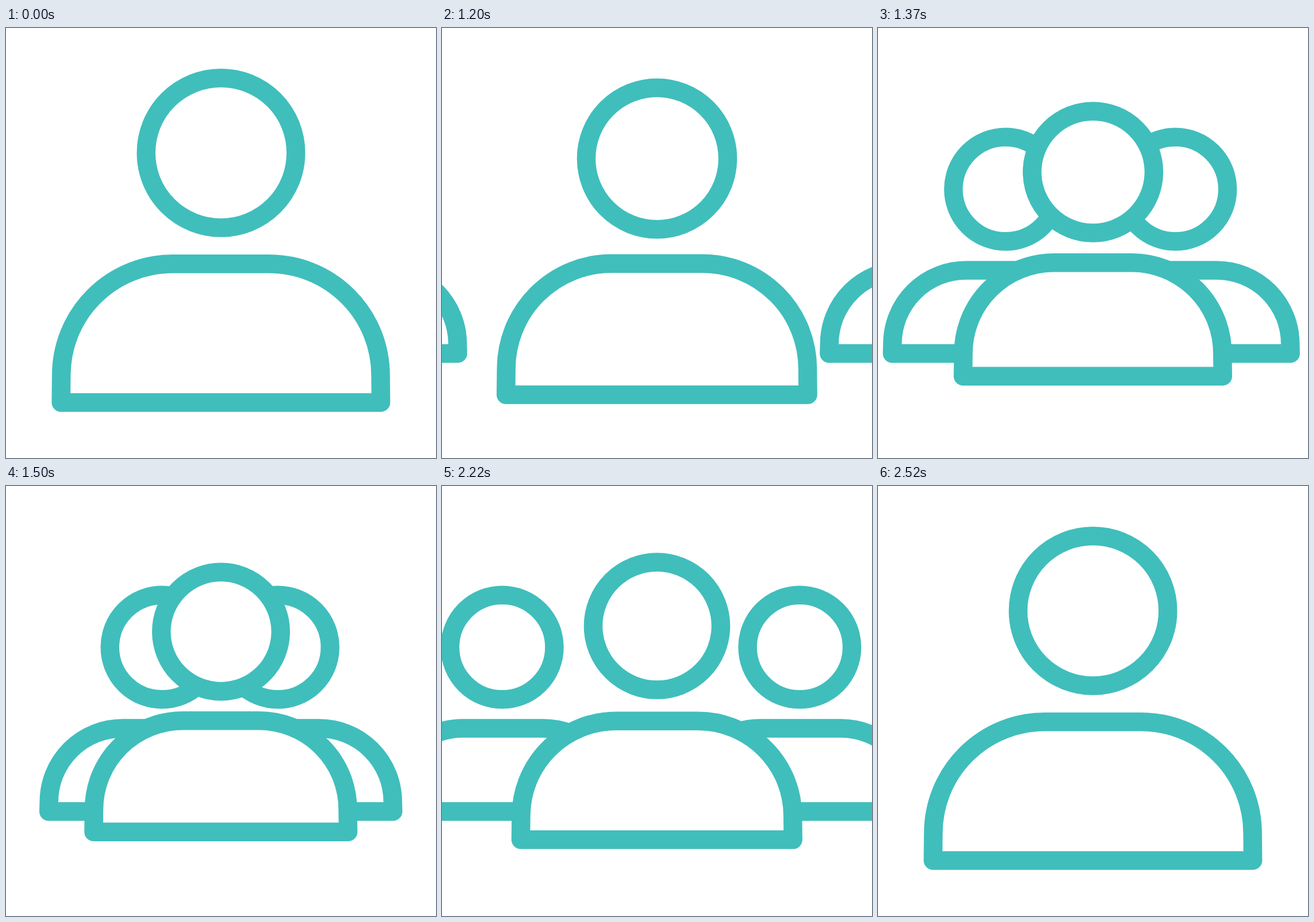
Write an HTML page that moves like this. It is 748 by 748 pixels and loops after 2550 ms.

```html
<!DOCTYPE html>
<html lang="en">
<head>
<meta charset="utf-8">
<title>One to many</title>
<style>
  html, body { margin: 0; width: 100%; height: 100%; overflow: hidden; background: #fff; }
  svg { display: block; width: 100%; height: 100%; }
  circle, path { fill: #fff; stroke: #40bebc; stroke-width: 32.5; stroke-linejoin: round; }
</style>
</head>
<body>
<svg viewBox="0 0 748 748">
  <g id="left"><path/><circle/></g>
  <g id="right"><path/><circle/></g>
  <g id="lead"><path/><circle/></g>
</svg>
<script>
const LOOP = 2550, TICK = 25, STEPS = 20;
const GATHER = 40, SPREAD = 81; // ticks at which each move begins

// Each figure: head centre and radius, body centre, half width, top, bottom, shoulder radius
const single = { hx: 374, hy: 217.2, hr: 130.3, x: 373.9, w: 277.7, top: 410.2, bottom: 651.5, r: 194 };
const grouped = { hx: 374, hy: 253.5, hr: 103.75, x: 373.8, w: 220.8, top: 408.2, bottom: 601.7, r: 154.5 };
const side = { hx: -1.5, hy: 280.5, hr: 90.75, x: 0, w: 198.3, top: 421.5, bottom: 566.2, r: 128 };

const mix = (a, b, p) => a + (b - a) * p;

// cubic-bezier(.6, 0, .4, 1)
function ease(t) {
  let lo = 0, hi = 1;
  for (let i = 0; i < 24; i++) {
    const s = (lo + hi) / 2, q = 1 - s;
    const x = 1.8 * s * q * q + 1.2 * s * s * q + s * s * s;
    if (x < t) lo = s; else hi = s;
  }
  return lo * lo * (3 - 2 * lo);
}

function pose(id, f) {
  const g = document.getElementById(id);
  const head = g.querySelector('circle');
  head.setAttribute('cx', f.hx);
  head.setAttribute('cy', f.hy);
  head.setAttribute('r', f.hr);
  const l = f.x - f.w, r = f.x + f.w, foot = 0.5;
  g.querySelector('path').setAttribute('d',
    `M${l - foot} ${f.bottom}L${l} ${f.top + f.r}` +
    `A${f.r} ${f.r} 0 0 1 ${l + f.r} ${f.top}H${r - f.r}` +
    `A${f.r} ${f.r} 0 0 1 ${r} ${f.top + f.r}L${r + foot} ${f.bottom}Z`);
}

function render(p) {
  const lead = {};
  for (const k in single) lead[k] = mix(single[k], grouped[k], p);
  pose('lead', lead);
  const place = x => ({ ...side, x, hx: x + side.hx });
  pose('left', place(mix(-338, 273, p)));
  pose('right', place(mix(1021.5, 474.5, p)));
}

// The motion runs at 40 ticks a second, with odd ticks 5 ms early
function progress(ms) {
  const tick = 2 * Math.floor(ms / (2 * TICK)) + (ms % (2 * TICK) >= 20 ? 1 : 0);
  const part = start => ease(Math.min(1, Math.max(0, (tick - start) / STEPS)));
  if (tick <= GATHER) return 0;
  if (tick >= SPREAD + STEPS) return 0;
  if (tick <= SPREAD) return tick >= GATHER + STEPS ? 1 : part(GATHER);
  return 1 - part(SPREAD);
}

const start = performance.now();
function frame() {
  render(progress((performance.now() - start) % LOOP));
  requestAnimationFrame(frame);
}
frame();
</script>
</body>
</html>
```
